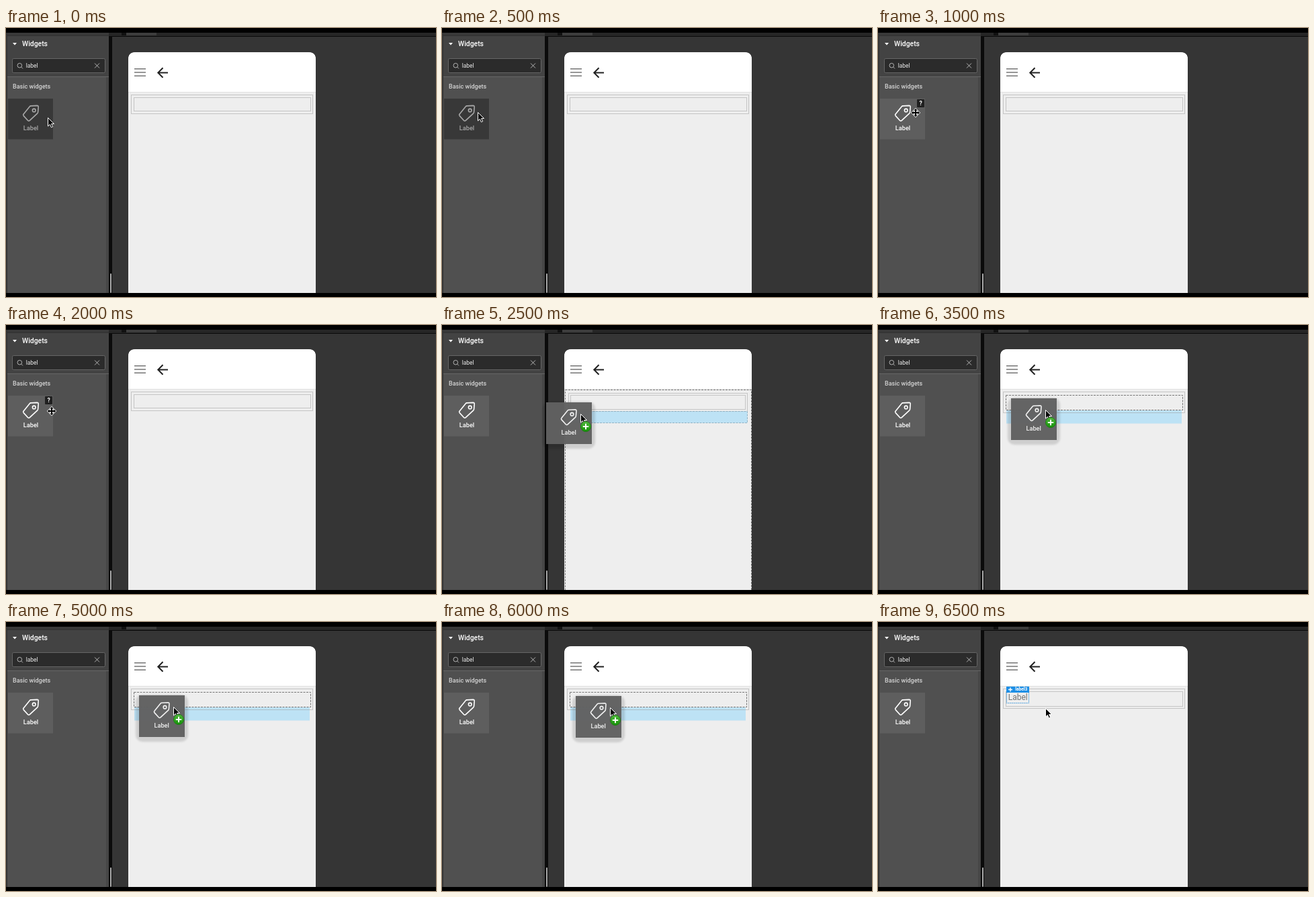
Animation of 640x400 px, one loop 7 s. Source, as an HTML page:

```html
<!DOCTYPE html>
<html lang="en">
<head>
<meta charset="utf-8">
<title>Dragging a label widget</title>
<style>
  html, body { margin: 0; width: 100%; height: 100%; overflow: hidden; background: #000; }
  svg { display: block; width: 100vw; height: 100vh; }
  text { font-family: Roboto, Arial, sans-serif; }
  .mid { font-weight: 500; }
  .line { fill: none; }
  .dot { fill: none; stroke: #9a9a9a; stroke-dasharray: 1 1; }
  .dash { fill: none; stroke: #777; stroke-dasharray: 3 1.5; }
</style>
</head>
<body>
<svg viewBox="0 0 640 400" xmlns="http://www.w3.org/2000/svg">
  <defs>
    <g id="tag" class="line" stroke-width="1.6" stroke-linejoin="round">
      <path d="M36.8 115.9L46.3 115.4Q48.3 115.4 48.2 117.4L47.6 125Q47.5 126 46.8 126.8L35.2 137.6Q33.8 138.8 32.5 137.5L26.2 130.6Q25 129.2 26.2 127.9L35.3 116.7Q36 116 36.8 115.9Z"/>
      <circle cx="41.7" cy="122.4" r="2.3"/>
    </g>
    <path id="arrow" d="M.5 .5V13L3.4 10.3L5.4 14.8L7.6 13.8L5.6 9.5H9.5Z" fill="#000" stroke="#fff" stroke-width="1" stroke-linejoin="round"/>
    <path id="move" d="M0 -6.3L2.6 -3.5H1V-1H3.5V-2.6L6.3 0L3.5 2.6V1H1V3.5H2.6L0 6.3L-2.6 3.5H-1V1H-3.5V2.6L-6.3 0L-3.5 -2.6V-1H-1V-3.5H-2.6Z" fill="#000" stroke="#fff" stroke-width="1.4" paint-order="stroke" stroke-linejoin="round"/>
    <linearGradient id="green" x2="0" y2="1">
      <stop stop-color="#50b83c"/><stop offset="1" stop-color="#159108"/>
    </linearGradient>
    <filter id="soft"><feGaussianBlur stdDeviation="1.8"/></filter>
  </defs>

  <!-- Widget panel -->
  <rect y="7" width="153" height="387" fill="#505050"/>
  <rect y="7" width="153" height="65" fill="#434343"/>
  <rect y="7" width="153" height="4" fill="#393939"/>
  <path d="M2 11.5H153" stroke="#303030"/>
  <path d="M2 72.5H153" stroke="#666"/>
  <rect x="149" y="73" width="4" height="321" fill="#464646"/>
  <rect y="7" width="2" height="387" fill="#333"/>
  <path d="M10 22H16L13 25.5Z" fill="#fff"/>
  <text class="mid" x="24" y="27" font-size="10.4" fill="#fff">Widgets</text>
  <rect x="9.5" y="45.5" width="138" height="21" rx="2" fill="#2b2b2b" stroke="#666"/>
  <g class="line" stroke="#b5b5b5">
    <circle cx="20.3" cy="55.7" r="3.3"/>
    <path d="M22.8 58.2L25 60.4M132 52.5L139 59.5M139 52.5L132 59.5"/>
  </g>
  <text x="29.7" y="59" font-size="8.4" fill="#eee">label</text>
  <text class="mid" x="10" y="90" font-size="9" fill="#d4d4d4">Basic widgets</text>
  <rect id="cell" x="3" y="105" width="67" height="60.5"/>
  <g id="item">
    <use href="#tag"/>
  </g>
  <text id="name" class="mid" x="37" y="152.3" font-size="9.2" text-anchor="middle">Label</text>
  <g id="help">
    <rect x="58" y="106" width="11" height="12" rx="1" fill="#202020"/>
    <text x="63.5" y="115" font-size="8.5" font-weight="700" text-anchor="middle" fill="#fff">?</text>
  </g>

  <!-- Canvas and phone -->
  <rect x="153" y="7" width="5" height="387" fill="#0b0b0b"/>
  <rect x="155" y="365" width="2" height="29" rx="1" fill="#aaa"/>
  <rect x="158" y="7" width="482" height="387" fill="#353535"/>
  <rect x="153" y="7" width="487" height="5" fill="#262626"/>
  <rect x="172" y="7" width="7" height="4" fill="#111"/>
  <rect x="179" y="7" width="45" height="4" fill="#3d3d3d"/>
  <path d="M158 12.5H640" stroke="#080808"/>
  <path d="M182 394V47Q182 36 193 36H450Q461 36 461 47V394Z" fill="#eee"/>
  <path d="M182 95V47Q182 36 193 36H450Q461 36 461 47V95Z" fill="#fff"/>
  <path d="M182 95.5H461" stroke="#e2e2e2"/>
  <path d="M191 60.8H208M191 66H208M191 71.2H208" stroke="#757575" stroke-width="1.5"/>
  <path class="line" d="M241 66.5H227M233.5 59.3L226.3 66.5L233.5 73.7" stroke="#222" stroke-width="2"/>

  <g id="idle">
    <rect class="dot" x="186.5" y="99.5" width="270" height="28"/>
    <rect class="dot" x="190.5" y="103.5" width="263" height="20"/>
  </g>
  <g id="page">
    <rect class="dash" x="183.5" y="96.5" width="277" height="304"/>
    <rect class="dot" x="188.5" y="101.5" width="266" height="27"/>
    <rect class="dot" x="191.5" y="104.5" width="260" height="21"/>
    <rect x="188.5" y="128.5" width="266" height="17" fill="#bde2f5" stroke="#8fb2c4" stroke-dasharray="3 1.5"/>
  </g>
  <g id="inner">
    <rect x="191" y="127" width="261" height="19.5" fill="#bde2f5"/>
    <rect class="dot" x="186.5" y="99.5" width="270" height="31"/>
    <rect class="dash" x="190.5" y="104.5" width="263" height="22"/>
  </g>
  <g id="done">
    <rect class="dot" x="186.5" y="99.5" width="270" height="29"/>
    <rect class="dot" x="190.5" y="103.5" width="263" height="22"/>
    <rect class="line" x="191.5" y="104.5" width="33" height="16" stroke="#4a9fdc" stroke-dasharray="2 1"/>
    <rect x="191" y="96" width="34" height="9" fill="#1d8fe6"/>
    <path d="M197 97.5V103.5M194 100.5H200" stroke="#fff" stroke-width="1.4"/>
    <text x="204.3" y="102.4" font-size="6.6" font-weight="700" fill="#fff">label3</text>
    <text x="193.7" y="116" font-size="12" fill="#757575">Label</text>
  </g>

  <g id="ghost">
    <rect x="-5" y="-1" width="78" height="70" rx="10" opacity=".13" filter="url(#soft)"/>
    <rect width="68" height="62" fill="#626262" opacity=".97"/>
    <use href="#tag" x="-3.2" y="-104.7" stroke="#f2f2f2"/>
    <text class="mid" x="33.7" y="47.5" font-size="9.2" text-anchor="middle" fill="#f2f2f2">Label</text>
  </g>
  <g id="pointer">
    <use id="arrowCursor" href="#arrow"/>
    <use id="moveCursor" href="#move"/>
    <g id="plus" transform="translate(8 19)">
      <circle r="7.6" fill="url(#green)" stroke="#137a0b" stroke-width=".7"/>
      <path d="M-4.2 0H4.2M0 -4.2V4.2" stroke="#fff" stroke-width="2"/>
    </g>
  </g>
  <rect width="640" height="7"/>
  <rect y="394" width="640" height="6"/>
</svg>
<script>
  const $ = id => document.getElementById(id);
  const STEP = 500;
  const pose = (x, y, cursor, zone = 'idle', tile = null) => ({ x, y, cursor, zone, tile });
  // While dragging, the pointer sits at (51, 17) on the tile plus a small slip.
  const drag = (x, y, zone, slip = 0) =>
    pose(x + 51 + slip, y + 17 + slip, 'plus', zone, [x, y]);

  const poses = [
    pose(62, 133, 'arrow'),
    pose(53, 125, 'arrow'),
    pose(56, 126, 'move'),
    pose(56, 125, 'move'),
    pose(68, 128, 'move'),
    drag(155, 115, 'page'),
    drag(211, 109, 'page'),
    drag(198, 109, 'inner'),
    drag(198, 109, 'inner', 1),
    drag(198, 109, 'inner', 1),
    drag(198, 109, 'inner'),
    drag(199, 110, 'inner'),
    drag(199, 110, 'inner'),
    pose(249, 128, 'arrow', 'done')
  ];

  const show = (id, on) => $(id).setAttribute('display', on ? 'inline' : 'none');
  const place = (id, x, y) => $(id).setAttribute('transform', `translate(${x} ${y})`);
  let last = -1;

  function draw(i) {
    const p = poses[i], hot = i >= 2;
    $('cell').setAttribute('fill', hot ? '#5e5e5e' : '#383838');
    $('item').setAttribute('stroke', hot ? '#fff' : '#a8a8a8');
    $('name').setAttribute('fill', hot ? '#fff' : '#a8a8a8');
    show('help', i >= 2 && i <= 4);
    for (const zone of ['idle', 'page', 'inner', 'done']) show(zone, zone === p.zone);
    show('ghost', p.tile);
    if (p.tile) place('ghost', ...p.tile);
    show('moveCursor', p.cursor === 'move');
    show('arrowCursor', p.cursor !== 'move');
    show('plus', p.cursor === 'plus');
    place('pointer', p.x, p.y);
  }

  function tick() {
    const i = Math.floor(performance.now() / STEP) % poses.length;
    if (i !== last) draw(last = i);
    requestAnimationFrame(tick);
  }
  tick();
</script>
</body>
</html>
```
